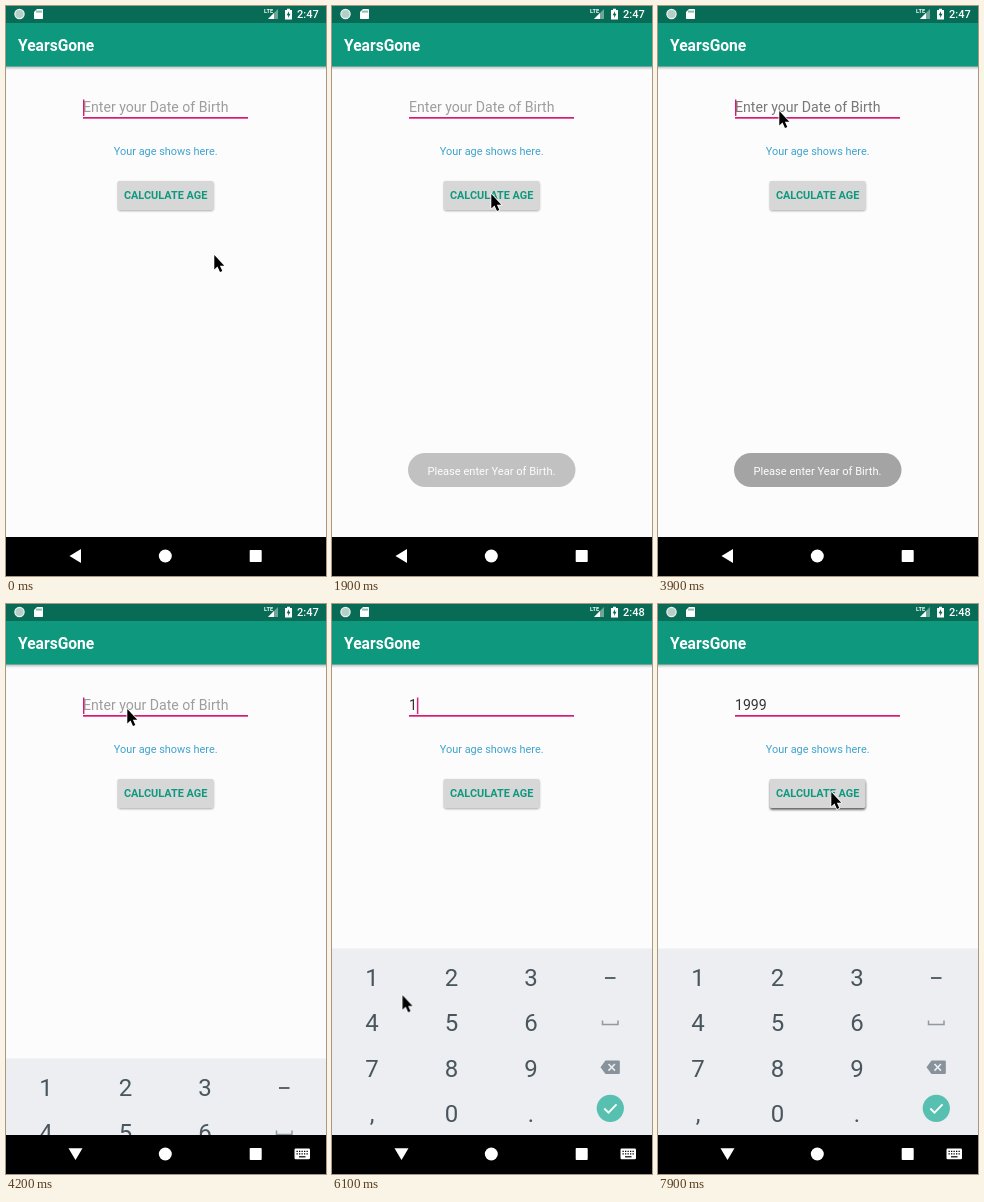
Write an HTML page that moves like this. It is 320 px wide and 570 px high and loops after 8 s.

```html
<!DOCTYPE html>
<html lang="en">
<head>
<meta charset="utf-8">
<title>YearsGone</title>
<style>
html, body { margin: 0; width: 100%; height: 100%; overflow: hidden; background: #fcfcfc; }
svg { display: block; width: 320px; height: 570px; font-family: Roboto, sans-serif; }
.mid { text-anchor: middle; }
.keys { font-size: 24px; fill: #49565d; text-anchor: middle; }

/* 100 ms of the loop is 1.25% */
.mouse, .toast, .board, .caret, .blink, .hint, .press, .before, .after,
.key1, .key9, .d1, .d2, .d3, .d4, .clockA, .clockB { animation: 8s step-end infinite; }

.mouse { animation-name: mouse; }
@keyframes mouse {
  0% { transform: translate(208px, 249px); animation-timing-function: steps(6); }
  7.5% { transform: translate(172px, 192px); }
  11.25% { transform: translate(172px, 192px); animation-timing-function: steps(4); }
  16.25% { transform: translate(159px, 188px); }
  35% { transform: translate(161px, 188px); animation-timing-function: steps(3); }
  38.75% { transform: translate(180px, 187px); }
  41.25% { transform: translate(180px, 187px); animation-timing-function: steps(5); }
  47.5% { transform: translate(121px, 105px); }
  56.25% { transform: translate(121px, 105px); animation-timing-function: steps(7); }
  65% { transform: translate(65px, 386px); animation-timing-function: steps(3); }
  68.75% { transform: translate(45px, 378px); }
  75% { transform: translate(45px, 378px); animation-timing-function: steps(6); }
  82.5% { transform: translate(196.5px, 457.5px); }
  90% { transform: translate(196.5px, 457.5px); animation-timing-function: steps(5); }
  96.25%, 100% { transform: translate(173px, 188px); }
}

.toast { animation-name: toast; }
@keyframes toast {
  0% { opacity: 0; }
  21.25% { opacity: 0; animation-timing-function: steps(5); }
  27.5% { opacity: 1; }
  46.25% { opacity: 1; animation-timing-function: steps(5); }
  52.5%, 100% { opacity: 0; }
}

.board { animation-name: board; }
@keyframes board {
  0% { transform: translateY(190px); }
  52.5% { transform: translateY(110px); }
  53.75% { transform: translateY(35px); }
  55%, 100% { transform: none; }
}

.caret { animation-name: caret; }
@keyframes caret {
  0% { transform: none; }
  72.5% { transform: translateX(7.9px); }
  83.75% { transform: translateX(15.8px); }
  87.5% { transform: translateX(23.7px); }
  90%, 100% { transform: translateX(31.6px); }
}
.blink { animation-name: blink; }
@keyframes blink {
  0%, 13.75%, 26.25%, 38.75%, 47.5%, 60%, 72.5%, 83.75% { opacity: 1; }
  7.5%, 20%, 32.5%, 45%, 53.75%, 66.25%, 78.75%, 96.25%, 100% { opacity: 0; }
}

.hint { animation-name: hint; }
@keyframes hint {
  0% { fill: #9d9d9d; }
  47.5% { fill: #777; }
  52.5% { fill: #9d9d9d; }
  72.5%, 100% { fill: transparent; }
}

.press { animation-name: press; }
@keyframes press {
  0%, 22.5% { opacity: 0; }
  20%, 98.75%, 100% { opacity: 1; }
}
.key1 { animation-name: key1; }
@keyframes key1 {
  0%, 72.5%, 100% { opacity: 0; }
  70% { opacity: 1; }
}
.key9 { animation-name: key9; }
@keyframes key9 {
  0%, 85%, 91.25%, 100% { opacity: 0; }
  82.5%, 87.5% { opacity: 1; }
}

.d1 { animation-name: d1; }
.d2 { animation-name: d2; }
.d3 { animation-name: d3; }
.d4 { animation-name: d4; }
@keyframes d1 { 0% { fill-opacity: 0; } 72.5%, 100% { fill-opacity: 1; } }
@keyframes d2 { 0% { fill-opacity: 0; } 83.75%, 100% { fill-opacity: 1; } }
@keyframes d3 { 0% { fill-opacity: 0; } 87.5%, 100% { fill-opacity: 1; } }
@keyframes d4 { 0% { fill-opacity: 0; } 90%, 100% { fill-opacity: 1; } }

.before { animation-name: before; }
.after { animation-name: after; }
@keyframes before { 0% { opacity: 1; } 52.5%, 100% { opacity: 0; } }
@keyframes after { 0% { opacity: 0; } 52.5%, 100% { opacity: 1; } }
.clockA { animation-name: clockA; }
.clockB { animation-name: clockB; }
@keyframes clockA { 0% { opacity: 1; } 53.75%, 100% { opacity: 0; } }
@keyframes clockB { 0% { opacity: 0; } 53.75%, 100% { opacity: 1; } }
</style>
</head>
<body>
<svg viewBox="0 0 320 570">
  <defs>
    <linearGradient id="shade" x2="0" y2="1">
      <stop stop-color="#000" stop-opacity=".28"/>
      <stop offset="1" stop-color="#000" stop-opacity="0"/>
    </linearGradient>
    <filter id="soft" x="-10%" y="-30%" width="120%" height="160%"><feGaussianBlur stdDeviation="1.1"/></filter>
  </defs>
  <rect width="320" height="570" fill="#fcfcfc"/>

  <!-- app bar -->
  <rect y="60" width="320" height="4" fill="url(#shade)"/>
  <rect y="17" width="320" height="43.5" fill="#0e997f"/>
  <text x="12" y="45" font-size="15.6" font-weight="600" fill="#fff">YearsGone</text>

  <!-- status bar -->
  <rect width="320" height="17" fill="#076b56"/>
  <circle cx="13.5" cy="8" r="4.6" fill="#b5cfc8" stroke="#e9f2f0" stroke-width="1.3"/>
  <path d="M31 3h5.2q.8 0 .8.8v8.4q0 .8-.8.8h-7.4q-.8 0-.8-.8V6z" fill="#fff"/>
  <path d="M31 4.6v2M33 4.6v2M35 4.6v2" stroke="#076b56" stroke-width=".9"/>
  <path d="M272 3v10h-10z" fill="#7fae a3" fill-opacity="0"/>
  <path d="M272 3v10h-10z" fill="#6fa598"/>
  <path d="M268 7v6h-6z" fill="#fff"/>
  <text x="258" y="7" font-size="5.6" font-weight="700" fill="#fff">LTE</text>
  <path d="M279 4h2V2.8h3V4h2v9.4h-7z" fill="#fff"/>
  <path d="M283 5.2l-2.4 4h1.6v2.8l2.3-4.2h-1.5z" fill="#076b56"/>
  <g font-size="11" font-weight="500" fill="#fff">
    <text class="clockA" x="291" y="12">2:47</text>
    <text class="clockB" x="291" y="12">2:48</text>
  </g>

  <!-- form -->
  <g font-size="14.1">
    <text class="hint" x="77" y="106">Enter your Date of Birth</text>
    <text x="77" y="106" fill="#333"><tspan class="d1">1</tspan><tspan class="d2">9</tspan><tspan class="d3">9</tspan><tspan class="d4">9</tspan></text>
  </g>
  <rect x="77" y="111" width="165" height="1.7" fill="#d81b70"/>
  <g class="caret"><rect class="blink" x="77" y="93.5" width="1.4" height="16.5" fill="#d81b70"/></g>
  <text class="mid" x="159.7" y="149" font-size="10.9" fill="#3fa4cd">Your age shows here.</text>
  <rect x="112" y="176" width="95.5" height="29" rx="2" opacity=".33" filter="url(#soft)"/>
  <rect class="press" x="112" y="177.5" width="95.5" height="28.5" rx="2" opacity=".5" fill-opacity=".45" filter="url(#soft)"/>
  <rect x="111.5" y="175" width="96" height="29" rx="1.8" fill="#d7d7d7"/>
  <text class="mid" x="159.6" y="193.3" font-size="10.9" font-weight="700" fill="#0e997f">CALCULATE AGE</text>

  <g class="toast">
    <rect x="76" y="447" width="167.5" height="34" rx="17" fill="#6b6b6b"/>
    <text class="mid" x="159.5" y="468.5" font-size="11.1" fill="#fff">Please enter Year of Birth.</text>
  </g>

  <!-- number pad -->
  <g class="board">
    <rect y="344.5" width="320" height="187" fill="#eceef2"/>
    <rect class="key1" x="1" y="351" width="79" height="45" rx="1.5" fill="#dcdee3"/>
    <rect class="key9" x="159.5" y="441" width="79" height="45" rx="1.5" fill="#dcdee3"/>
    <g class="keys">
      <text x="40" y="382">1</text><text x="119.5" y="382">2</text><text x="199" y="382">3</text>
      <text x="40" y="427.3">4</text><text x="119.5" y="427.3">5</text><text x="199" y="427.3">6</text>
      <text x="40" y="472.5">7</text><text x="119.5" y="472.5">8</text><text x="199" y="472.5">9</text>
      <text x="40" y="517.5">,</text><text x="119.5" y="517.5">0</text><text x="199" y="517.5">.</text>
    </g>
    <path d="M273 374h10.5" stroke="#49565d" stroke-width="1.8"/>
    <path d="M270.5 416.5v4h15.5v-4" fill="none" stroke="#8f999f" stroke-width="1.5"/>
    <path d="M268.5 463.3l5-6.8h13.3q1 0 1 1v11.6q0 1-1 1h-13.3z" fill="#87929a"/>
    <path d="M276.5 460l6.4 6.6M282.9 460l-6.4 6.6" stroke="#eceef2" stroke-width="1.6"/>
    <circle cx="278.3" cy="504.3" r="13.6" fill="#57c0b0"/>
    <path d="M272.3 504.5l4.2 4.2 8-8.4" fill="none" stroke="#fff" stroke-width="1.8"/>
  </g>

  <!-- navigation bar -->
  <rect y="531" width="320" height="39"/>
  <g fill="#fff">
    <path class="before" d="M63.5 550l11.5-7v14z"/>
    <path class="after" d="M62.5 544.3h14l-7 11.7z"/>
    <circle cx="159.3" cy="550" r="6.5"/>
    <rect x="243.7" y="544" width="12" height="12" rx=".8"/>
    <g class="after">
      <rect x="288.5" y="544.5" width="15.5" height="10.8" rx="1.2"/>
      <path d="M290.5 547.3h11.6M290.5 549.8h11.6" stroke="#000" stroke-width="1.3" stroke-dasharray="1.3 1.2"/>
      <path d="M293 552.8h6.5" stroke="#000" stroke-width="1.2"/>
    </g>
  </g>

  <g class="mouse">
    <path d="M.3 0v14.4l3.2-3 2.5 5.6 2.3-1-2.4-5.3h4.4z" stroke="#fff" stroke-width="1.6" stroke-linejoin="round" paint-order="stroke"/>
  </g>
</svg>
</body>
</html>
```
